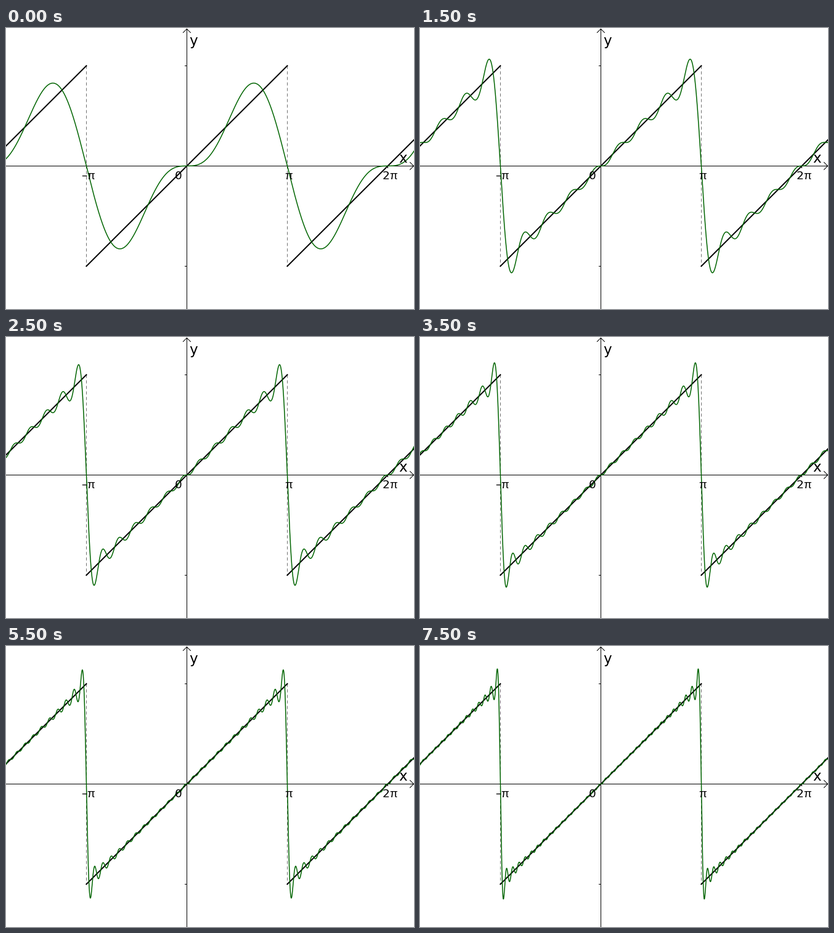
A matplotlib script that plays this animation: 662 px wide and 457 px high, repeating every 8 s.

```python
import numpy as np
import matplotlib.pyplot as plt
from matplotlib.animation import FuncAnimation

W, H, DPI = 662, 457, 100
PT = 72 / DPI               # points per pixel
OX, OY, PI = 293.4, 224.4, 163   # origin and length of pi in pixels
FRAMES, INTERVAL = 16, 500

plt.rcParams["font.family"] = "DejaVu Sans"
fig = plt.figure(figsize=(W / DPI, H / DPI), dpi=DPI, facecolor="white")
ax = fig.add_axes([0, 0, 1, 1])
ax.set_xlim(0, W)
ax.set_ylim(H, 0)
ax.axis("off")


def line(xs, ys, width=1.0, color="black", z=2, **kw):
    return ax.plot(xs, ys, color=color, lw=width * PT, zorder=z, **kw)[0]


def label(x, y, s, size, font="DejaVu Sans"):
    ax.text(x, y, s, fontsize=size * PT, family=font,
            ha="left", va="baseline", zorder=6)


# axes with open arrowheads
line([0, W], [OY, OY])
line([OX, OX], [1, H])
line([655.5, 661.5, 655.5], [OY - 6, OY, OY + 6])
line([OX - 6, OX, OX + 6], [7.5, 1.5, 7.5])

# ticks
for k in (-1, 1):
    line([OX - 3, OX], [OY + k * PI] * 2)
for k in (-1, 1, 2):
    line([OX + k * PI] * 2, [OY, OY + 3])

# jumps and sawtooth
for k in (-1, 1):
    line([OX + k * PI] * 2, [OY - PI, OY + PI], color="#707070", z=1,
         dashes=(5, 4), dash_capstyle="butt")
for k in (-2, 0, 2):
    mid = OX + k * PI
    line([mid - PI, mid + PI], [OY + PI, OY - PI], width=2, z=3)

label(297, 27.8, "y", 23)
label(637.5, 218.7, "x", 23)
label(273.8, 246, "0", 18.5)
label(121.8, 244.5, "–", 18.5)
label(610.8, 246, "2", 18.5)
for x in (131.4, 452.5, 622.6):
    label(x, 246, "π", 18.5, "Liberation Sans")

px = np.arange(-1, W + 1, 0.25)
theta = (px - OX) * np.pi / PI
curve = line(px, np.full_like(px, OY), width=1.5, color="#006400", z=4)


def update(i):
    n = np.arange(1, 2 * i + 3)[:, None]    # two more harmonics each step
    total = 2 * np.sum((-1.0) ** (n + 1) * np.sin(n * theta) / n, axis=0)
    curve.set_ydata(OY - total * PI / np.pi)
    return [curve]


anim = FuncAnimation(fig, update, frames=FRAMES, interval=INTERVAL,
                     init_func=lambda: update(0), repeat=True, repeat_delay=0)
plt.show()
```
